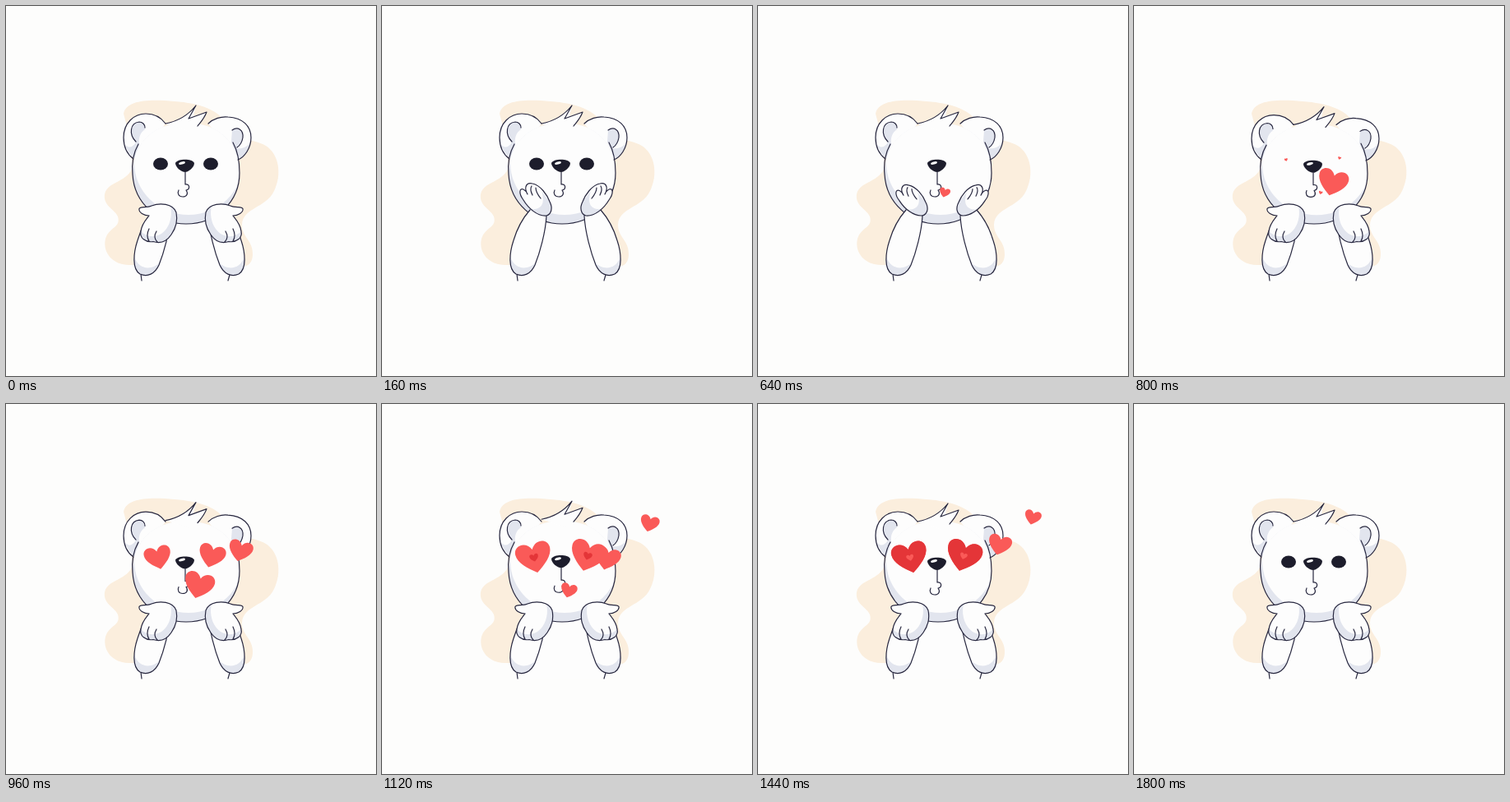
An HTML page for the animation above (1840 ms loop, 450 by 450 pixels).

```html
<!DOCTYPE html>
<html lang="en">
<head>
<meta charset="utf-8">
<title>Bear blowing a kiss</title>
<style>
  html, body { margin: 0; width: 100%; height: 100%; overflow: hidden; background: #fdfdfc; }
  svg { display: block; width: 100vw; height: 100vh; }
  .line { fill: none; stroke: #27273f; stroke-width: 1.2; stroke-linecap: round; stroke-linejoin: round; vector-effect: non-scaling-stroke; }
  .skin { fill: #fdfdfd; }
  .shade { fill: #e2e5ee; }
  .dark { fill: #1d1d2c; }
  .coral { fill: #fa5a58; }
  .red { fill: #e43538; }
</style>
</head>
<body>
<svg viewBox="0 0 450 450">
  <defs>
    <path id="heart" d="M0 9C-5 5.5-10.5 1-10.5-4C-10.5-9.5-3-11 0-5C3-11 10.5-9.5 10.5-4C10.5 1 5 5.5 0 9Z"/>
    <path id="skull" d="M154 205C153 168 178 142 219 142C260 142 284 168 284 203C284 238 256 265 219 265C185 265 156 240 154 205Z"/>
    <clipPath id="inHead"><use href="#skull"/></clipPath>
    <g id="arm">
      <path class="skin" d="M200 255C199 275 192 300 186 315C181 326 172 330 163 326C153 320 155 300 160 285C165 268 173 256 180 248Z"/>
      <path class="shade" d="M156 305C162 322 178 321 187 312C181 326 172 330 163 326C156 322 154 313 156 305Z"/>
      <path class="line" d="M200 255C199 275 192 300 186 315C181 326 172 330 163 326C153 320 155 300 160 285C165 268 173 256 180 248"/>
    </g>
    <g id="hang">
      <path class="skin" d="M174 255C168 255 161 251 162 246.5C163 243 171 246 177 243C187 239 203 240 207 251C209 261 206 271 201 278C195 287 187 289 179 286.5C170 288 162 282 164 274C165 265 170 260 174 255Z"/>
      <path class="shade" d="M207 251C209 261 206 271 201 278C195 287 187 289 179 286.5C170 288 162 282 164 274C174 284 188 281 195 271C201 263 202 251 200 244C204 246 206 248 207 251Z"/>
      <path class="line" d="M174 255C168 255 161 251 162 246.5C163 243 171 246 177 243C187 239 203 240 207 251C209 261 206 271 201 278C195 287 187 289 179 286.5C170 288 162 282 164 274C165 265 170 260 174 255M174 286C171 281 171 277 174 271M184 287C180 283 180 279 183 274"/>
    </g>
    <g id="raised">
      <path id="palm" class="skin"/>
      <path id="palmShade" class="shade"/>
      <path id="palmLine" class="line"/>
    </g>
  </defs>

  <path fill="#fbeedd" d="M143 131C146 114 175 113 205 116C235 118 262 127 268 145C275 165 300 160 316 170C332 180 336 205 326 225C316 246 288 245 287 266C287 282 301 285 300 303C299 320 285 318 270 316L150 315C130 315 117 300 121 283C126 268 140 270 136 256C132 247 118 243 120 229C123 213 150 214 154 195L148 150Z"/>
  <path class="skin" d="M178 250H268L276 290L270 334H165L170 290Z"/>
  <path class="line" d="M164 326L165 334M272 327L270 334"/>

  <g id="head">
    <path class="skin" d="M160 187C150 183 143 172 143 160C143 142 156 131 170 131C181 131 189 136 194 143ZM246 143C252 137 262 134 270 135C288 136 298 146 298 160C298 173 290 184 281 187Z"/>
    <path class="shade" d="M145 168C149 174 154 172 158 166C149 155 151 143 162 141C167 142 170 146 169 150C163 154 161 161 162 168L157 186C151 182 147 175 145 168ZM275 151C282 147 288 151 288 160C287 166 284 170 280 173C287 174 293 172 297 166C295 177 289 184 282 187L274 165Z"/>
    <g clip-path="url(#inHead)">
      <use href="#skull" class="shade"/>
      <ellipse class="skin" cx="222" cy="191" rx="66" ry="63"/>
    </g>
    <path class="line" d="M155 186C147 180 143 172 143 160C143 142 156 131 170 131C181 131 189 136 194 143M246 143C252 137 262 134 270 135C288 136 298 146 298 160C298 173 290 184 282 187M161 168C154 180 153 195 154 205C156 240 185 265 219 265C256 265 284 238 284 203C284 190 281 175 276 166M158 165C149 156 151 142 162 141C166 141 169 144 169 148M275 151C282 146 289 151 288 160C287 166 284 170 281 172"/>
    <g id="face">
      <path class="skin" d="M194 143C210 140 223 131 231 121L228 134L244 129C241 137 237 141 233 146L225 153Z"/>
      <path class="line" d="M194 143C210 140 223 131 231 121L222 137L244 129C241 137 237 141 233 146"/>
      <path class="dark" d="M206 191C208 186 226 185 229 191C229 197 221 202 218 202C213 202 206 196 206 191Z"/>
      <ellipse class="skin" cx="214" cy="191" rx="4" ry="1.6" transform="rotate(-15 214 191)"/>
      <path class="line" d="M218 202V217C224 216 224 223 219 224C222 228 220 232 215 232C210 232 208 228 210 224"/>
    </g>
    <g id="eyes"><ellipse class="dark" cx="188" cy="192" rx="9" ry="7.5"/><ellipse class="dark" cx="249" cy="192" rx="9" ry="7.5"/></g>
  </g>
  <g id="eyeHearts"></g>

  <use href="#arm"/>
  <use href="#arm" transform="matrix(-1 0 0 1 446 0)"/>
  <g id="up"><use href="#raised"/><use href="#raised" transform="matrix(-1 0 0 1 448 0)"/></g>
  <g id="down"><use href="#hang"/><use href="#hang" transform="matrix(-1 0 0 1 450 0)"/></g>
  <g id="floats"></g>
</svg>

<script>
const LOOP = 1840, STEP = 40;
const $ = id => document.getElementById(id);
const clamp = u => Math.max(0, Math.min(1, u));
const smooth = u => (u = clamp(u), u * u * (3 - 2 * u));

// Eased value at time t through pairs of time and value
function key(t, ...k) {
  if (t <= k[0]) return k[1];
  for (let i = 2; i < k.length; i += 2)
    if (t <= k[i])
      return k[i - 1] + (k[i + 1] - k[i - 1]) * smooth((t - k[i - 2]) / (k[i] - k[i - 2]));
  return k[k.length - 1];
}

// Raised paw: on the cheek, then over the mouth
const poses = {
  palm: ["M200 255C189 256 178 246 172 236C166 228 167 221 172 223C174 224 176 226 177 229C172 220 176 214 183 216C193 218 201 230 204 238C208 246 206 253 200 255",
         "M201 257C189 258 181 249 180 238C178 227 179 216 184 216C188 216 190 222 191 228C191 217 198 210 206 210C215 210 222 219 222 229C222 243 212 256 201 257"],
  palmShade: ["M204 238C208 246 206 253 200 255C192 256 186 252 182 247C194 248 199 240 194 225Z",
              "M222 229C222 243 212 256 201 257C192 258 186 253 183 248C200 250 207 238 209 211Z"],
  folds: ["M183 230C181 226 180 222 182 219M193 234C189 229 187 225 187 221",
          "M200 229C200 224 202 219 206 216M209 232C209 224 213 218 218 216"]
};
function morph([a, b], u) {
  const to = b.match(/[\d.]+/g);
  let i = 0;
  return a.replace(/[\d.]+/g, n => (+n + (to[i++] - n) * u).toFixed(2));
}

const heart = (x, y, s, angle, tone) => s <= 0 ? "" :
  `<use href="#heart" class="${tone}" transform="translate(${x} ${y}) rotate(${angle}) scale(${s})"/>`;
const stretch = (id, y, s) => {
  $(id).setAttribute("transform", `translate(0 ${y}) scale(1 ${s}) translate(0 ${-y})`);
  $(id).style.display = s > 0.01 ? "" : "none";
};

function floating(age) {
  const dx = 107 * smooth((age - 75) / 540);
  const size = age < 0 ? 0 : age < 150 ? 0.2 + age / 94 :
    key(age, 150, 1.75, 220, 1.75, 400, 1.35, 520, 1.1, 670, 0.95, 720, 0);
  return heart(227 + dx, 227 - dx * 0.83, size, 15, "coral");
}

function draw(t) {
  const kiss = key(t, 200, 0, 420, 1, 540, 1, 640, 0);
  $("palm").setAttribute("d", morph(poses.palm, kiss));
  $("palmShade").setAttribute("d", morph(poses.palmShade, kiss));
  $("palmLine").setAttribute("d", morph(poses.palm, kiss) + morph(poses.folds, kiss));
  stretch("down", 252, key(t, 20, 1, 85, 0, 700, 0, 770, 1));
  stretch("up", 254, key(t, 80, 0, 150, 1, 630, 1, 705, 0));

  stretch("head", 265, key(t, 640, 1, 800, 0.988, 1000, 1));
  stretch("eyes", 192, key(t, 390, 1, 560, 0, 1680, 0, 1770, 1));
  $("face").setAttribute("transform", `translate(0 ${key(t, 800, 0, 1100, -2.8, 1400, 0)})`);

  const fade = key(t, 1600, 1, 1720, 0);
  $("eyeHearts").innerHTML = [778, 1060, 1390].map((start, i) => {
    const s = 2.05 * clamp((t - start) / 240) * fade, tone = i % 2 ? "red" : "coral";
    return heart(185, 187, s, -13, tone) + heart(250, 185, s, 16, tone);
  }).join("");
  $("floats").innerHTML = [600, 798, 1050].map(start => floating(t - start)).join("");
}

function tick() {
  draw(Math.floor(performance.now() % LOOP / STEP) * STEP);
  requestAnimationFrame(tick);
}
tick();
</script>
</body>
</html>
```
